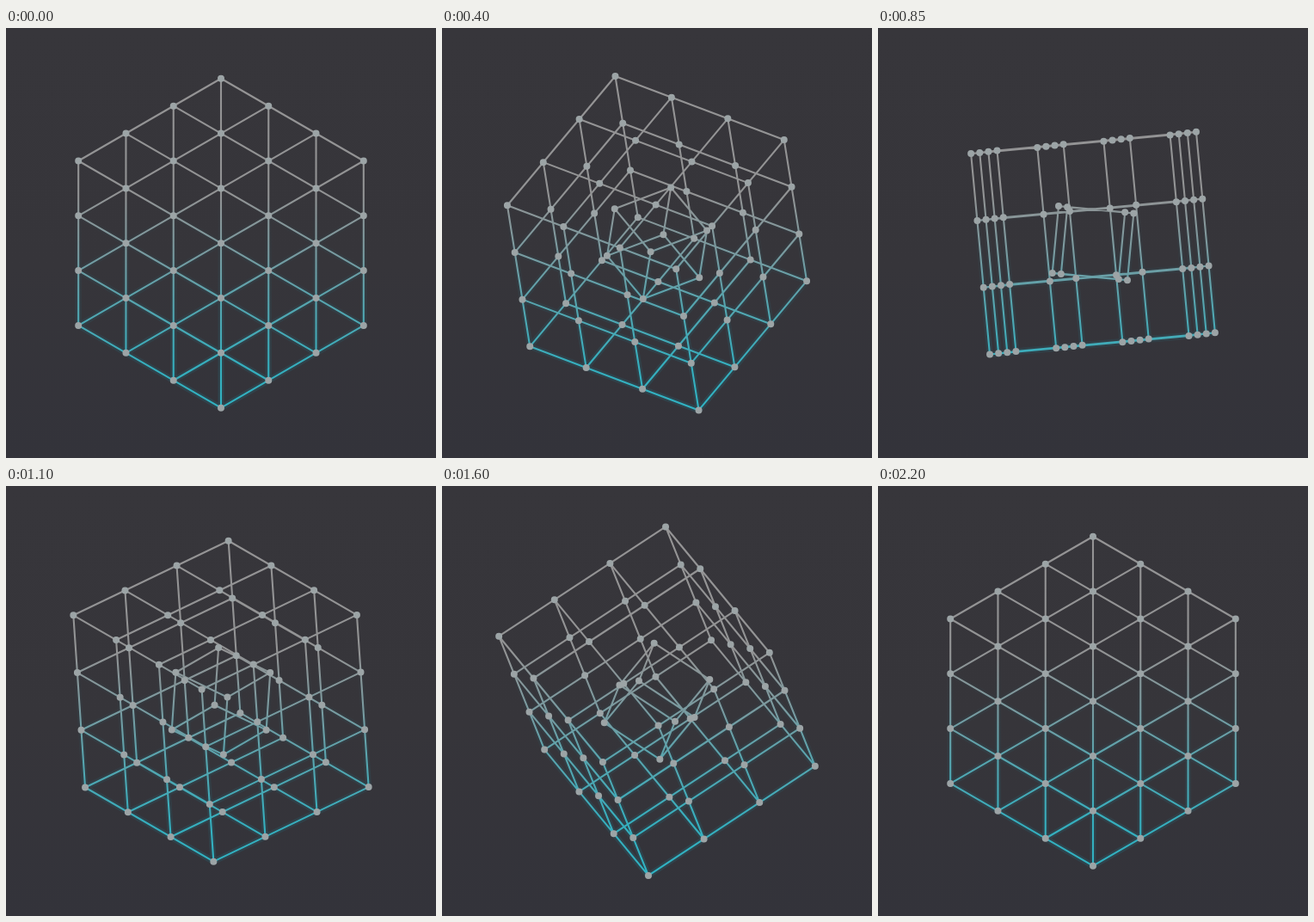
An HTML page for the animation above (2300 ms loop, 500 by 500 pixels).

```html
<!DOCTYPE html>
<html lang="en">
<head>
<meta charset="utf-8">
<title>Lattice cube</title>
<style>
  html, body { margin: 0; width: 100%; height: 100%; overflow: hidden; background: #36353a; }
  svg { display: block; width: 100vw; height: 100vh; }
  path { fill: none; stroke-linecap: round; }
</style>
</head>
<body>
<svg viewBox="0 0 500 500">
  <defs>
    <linearGradient id="back" x2="0" y2="1">
      <stop offset="0" stop-color="#37363b"/>
      <stop offset=".55" stop-color="#36353a"/>
      <stop offset="1" stop-color="#33333a"/>
    </linearGradient>
    <linearGradient id="ink" gradientUnits="userSpaceOnUse" x1="0" x2="0" y1="50" y2="450">
      <stop offset="0" stop-color="#959495"/>
      <stop offset=".36" stop-color="#929394"/>
      <stop offset=".52" stop-color="#7a9a9f"/>
      <stop offset=".68" stop-color="#55a5af"/>
      <stop offset=".85" stop-color="#36aebd"/>
      <stop offset="1" stop-color="#2fb3c3"/>
    </linearGradient>
    <linearGradient id="halo" gradientUnits="userSpaceOnUse" x1="0" x2="0" y1="200" y2="430">
      <stop offset="0" stop-color="#1d7f92" stop-opacity="0"/>
      <stop offset="1" stop-color="#1d7f92" stop-opacity=".2"/>
    </linearGradient>
  </defs>
  <rect width="500" height="500" fill="url(#back)"/>
  <path id="glow" stroke="url(#halo)" stroke-width="7"/>
  <path id="lines" stroke="url(#ink)" stroke-width="2.1"/>
  <path id="dots" stroke="#9ca4a6" stroke-width="8"/>
</svg>
<script>
const LOOP = 2300, STEP = 50, TICK = 40;
const START = 45, SPAN = 2150;
const UNIT = 234.5 / 6;
const TILT = Math.asin(1 / Math.sqrt(3));
const GRID = [-3, -1, 1, 3];
const [glow, lines, dots] = ['glow', 'lines', 'dots'].map(id => document.getElementById(id));

const isInner = p => p.every(v => Math.abs(v) === 1);

// Lattice nodes, plus the rods of the outer shell and of the small core cube
const nodes = [], rods = [];
for (const i of GRID) for (const j of GRID) {
  for (const k of GRID) nodes.push([i, j, k]);
  const end = Math.max(Math.abs(i), Math.abs(j));
  for (let axis = 0; axis < 3; axis++) {
    const rod = [-end, end].map(v => {
      const p = [i, j];
      p.splice(axis, 0, v);
      return p;
    });
    rods.push(rod);
  }
}

function projector(turn) {
  const spin = Math.PI / 4 - turn, roll = -turn;
  const cs = Math.cos(spin), ss = Math.sin(spin);
  const cr = Math.cos(roll), sr = Math.sin(roll);
  const ct = Math.cos(TILT), st = Math.sin(TILT);
  return p => {
    const [a, b, c] = p;
    const up = b * cr - c * sr, side = b * sr + c * cr;
    const x = a * cs - side * ss, depth = a * ss + side * cs;
    const y = up * ct + depth * st;
    // The core turns the opposite way: a mirror image of the shell
    const sx = isInner(p) ? -x : x;
    return (250 + sx * UNIT).toFixed(2) + ' ' + (250.2 + y * UNIT).toFixed(2);
  };
}

function draw(time) {
  const held = Math.floor(time % LOOP / STEP) * STEP;
  const tick = Math.floor(held / TICK) * TICK;
  const u = Math.min(1, Math.max(0, (tick - START) / SPAN));
  const at = projector(Math.PI * (1 - Math.cos(Math.PI * u)) / 2);
  const d = rods.map(([p, q]) => `M${at(p)}L${at(q)}`).join('');
  lines.setAttribute('d', d);
  glow.setAttribute('d', d);
  dots.setAttribute('d', nodes.map(p => `M${at(p)}h0`).join(''));
}

const begin = performance.now();
function loop() {
  draw(performance.now() - begin);
  requestAnimationFrame(loop);
}
loop();
</script>
</body>
</html>
```
